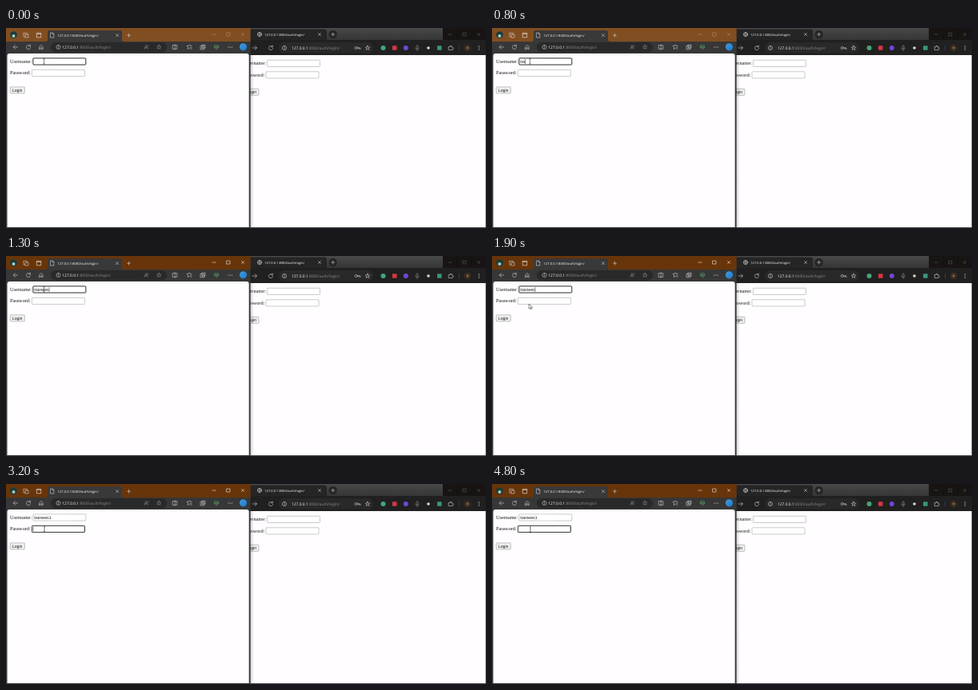
These frames come from a looping animation (600 by 251 pixels, 5 s). An HTML page:

```html
<!DOCTYPE html>
<html lang="en">
<head>
<meta charset="utf-8">
<title>Login form</title>
<style>
  html, body { margin: 0; width: 100%; height: 100%; overflow: hidden; background: #fff; }
  svg { display: block; width: 100vw; height: 100vh; }
  text { font-family: "Open Sans", "Noto Sans", sans-serif; text-rendering: geometricPrecision; white-space: pre; }
  .label { font: 6.25px "Liberation Serif", "Times New Roman", serif; fill: #111; }
  .entry { font: 5.2px "Liberation Sans", Arial, sans-serif; fill: #111; }
  .tab { font-size: 4.15px; fill: #fff; }
  .url { font-size: 4.95px; fill: #8c8c8c; }
  .url tspan { fill: #fff; }
  .icon { fill: none; stroke: #d2d2d2; stroke-width: .6; stroke-linecap: round; stroke-linejoin: round; }
  .dim { stroke: #8d8d8d; }
  .field { fill: #fff; stroke: #8c8c8c; stroke-width: .45; }
  .ring { fill: none; stroke: #1c1c1c; stroke-width: .8; }

  .anim { animation: 5s step-end infinite; }
  #bar { animation-name: bar; }
  #controls { animation-name: controls; }
  #pen { animation-name: type; }
  #nameCaret { animation-name: nameCaret; }
  #nameRing { animation-name: nameRing; }
  #passRing { animation-name: passRing; }
  #passHover { animation-name: passHover; }
  #passCaret { animation-name: blink; }
  #pointer { animation-name: move; }
  #beam { animation-name: beam; }
  #arrow { animation-name: arrow; }

  @keyframes bar { 0% { fill: #814e21; } 26%, 100% { fill: #68350a; } }
  @keyframes controls { 0% { stroke: #a98b70; } 26%, 100% { stroke: #ece6e0; } }
  @keyframes type {
    0% { transform: translateX(0); }
    14% { transform: translateX(1.45px); }
    16% { transform: translateX(6.07px); }
    18% { transform: translateX(7.22px); }
    20% { transform: translateX(10.11px); }
    22% { transform: translateX(13px); }
    24% { transform: translateX(18.49px); }
    46%, 100% { transform: translateX(21.38px); }
  }
  @keyframes nameCaret { 0% { opacity: 0; } 14% { opacity: 1; } 46%, 100% { opacity: 0; } }
  @keyframes nameRing { 0% { opacity: 1; } 64%, 100% { opacity: 0; } }
  @keyframes passRing { 0% { opacity: 0; } 64%, 100% { opacity: 1; } }
  @keyframes passHover { 0% { opacity: 0; } 48%, 100% { opacity: 1; } }
  @keyframes blink { 0% { opacity: 0; } 64% { opacity: 1; } 74% { opacity: 0; } 84% { opacity: 1; } 96%, 100% { opacity: 0; } }
  @keyframes move {
    0% { transform: translate(47.5px, 41.7px); }
    32% { transform: translate(47px, 43px); }
    34% { transform: translate(46.5px, 49px); }
    36% { transform: translate(46.2px, 55px); }
    38% { transform: translate(46.2px, 60px); }
    40% { transform: translate(46px, 63.5px); }
    42% { transform: translate(46px, 65px); }
    46% { transform: translate(47px, 62px); }
    48% { transform: translate(48px, 56.6px); }
    72%, 100% { transform: translate(48px, 57.4px); }
  }
  @keyframes beam { 0% { opacity: 1; } 34% { opacity: 0; } 48%, 100% { opacity: 1; } }
  @keyframes arrow { 0% { opacity: 0; } 34% { opacity: 1; } 48%, 100% { opacity: 0; } }
</style>
</head>
<body>
<svg viewBox="0 0 600 251" preserveAspectRatio="none">
  <defs>
    <linearGradient id="strip" x2="0" y2="1">
      <stop stop-color="#4a494a"/><stop offset="1" stop-color="#343334"/>
    </linearGradient>
    <linearGradient id="shade">
      <stop stop-color="#000" stop-opacity=".18"/><stop offset="1" stop-color="#000" stop-opacity="0"/>
    </linearGradient>
    <linearGradient id="blue" x2="1" y2="1">
      <stop stop-color="#3f9de0"/><stop offset="1" stop-color="#2478c8"/>
    </linearGradient>
    <g id="form">
      <text class="label" x="5" y="43.8">Username:</text>
      <text class="label" x="5" y="58.3">Password:</text>
      <rect class="field" x="33.8" y="37.9" width="66" height="8.2" rx=".8"/>
      <rect class="field" x="32.4" y="52.4" width="66" height="8.2" rx=".8"/>
      <rect x="5.2" y="73.9" width="18.2" height="8.1" rx="1" fill="#efefef" stroke="#808080" stroke-width=".45"/>
      <text class="entry" x="7.8" y="79.8">Login</text>
    </g>
    <path id="plus" d="M-2 0H2M0-2V2"/>
    <path id="cross" d="M-1.5-1.5L1.5 1.5M1.5-1.5L-1.5 1.5"/>
    <path id="reload" d="M2.1-1.5A2.6 2.6 0 1 0 2.6 .5M2.3-3V-1.2H.5"/>
    <path id="star" d="M0-2.8L.8-.9 2.7-.8 1.2 .5 1.7 2.4 0 1.3-1.7 2.4-1.2 .5-2.7-.8-.8-.9Z"/>
    <path id="info" d="M0-2.6A2.6 2.6 0 1 1 0 2.6A2.6 2.6 0 1 1 0-2.6M0-.2V1.2M0-1.3V-1.2"/>
    <path id="puzzle" d="M-2.4-1.4H-.8A.9 .9 0 1 1 .8-1.4H2V0A.8 .8 0 1 1 2 1.3V2.6H-2.4Z"/>
  </defs>

  <!-- right window -->
  <rect width="600" height="251" fill="#fffdff"/>
  <rect x="300" width="300" height="17" fill="url(#strip)"/>
  <path d="M300 1.5H398Q401 1.5 401 4.5V15H300Z" fill="#252525"/>
  <rect x="546" width="54" height="15.5" fill="#171413"/>
  <path d="M564 0V15M582 0V15" stroke="#0e0c0b" stroke-width=".6"/>
  <g class="icon" style="stroke: #6f665f; stroke-width: .5">
    <path d="M553 8H557M571.2 6.2H574.8V9.8H571.2Z"/>
    <use href="#cross" x="591" y="8"/>
  </g>
  <rect x="300" y="15" width="300" height="19" fill="#202020"/>
  <rect x="341" y="18" width="118" height="13.5" rx="6.7" fill="#292929"/>
  <text class="tab" style="font-size: 4.05px" x="323.3" y="9.6">127.0.0.1:8000/auth/login/</text>
  <circle cx="408.7" cy="8" r="5.2" fill="#252525"/>
  <g class="icon">
    <circle cx="317" cy="8" r="2.6"/>
    <path d="M314.5 8H319.5M317 5.4Q314.7 8 317 10.6Q319.3 8 317 5.4" stroke-width=".45"/>
    <use href="#cross" x="392" y="8"/>
    <use href="#plus" x="408.7" y="8"/>
    <path d="M308 25H313.5M311.2 22.7L313.5 25 311.2 27.3"/>
    <use href="#reload" x="331" y="25"/>
    <use href="#info" x="348" y="25"/>
    <circle cx="437.7" cy="25" r="1.6"/>
    <path d="M439.3 25H443V26.5M441.3 25V26.3"/>
    <use href="#star" x="452" y="25"/>
    <path d="M513 22.7A1 1 0 0 1 515 22.7V25A1 1 0 0 1 513 25ZM511.8 25A2.2 2.2 0 0 0 516.2 25M514 27.3V28.5" class="dim"/>
    <use href="#puzzle" x="556" y="25"/>
    <path d="M566.5 22V28" stroke="#4a4a4a"/>
  </g>
  <text class="url" style="font-size: 4.88px" x="357" y="26.8"><tspan>127.0.0.1</tspan>:8000/auth/login/</text>
  <circle cx="471.5" cy="25" r="3" fill="#43a77b"/>
  <rect x="482.9" y="22.2" width="5.6" height="5.6" rx=".8" fill="#d93540"/>
  <circle cx="499.8" cy="25" r="3" fill="#7047d8"/>
  <circle cx="528" cy="25" r="1.8" fill="#d7d7d7"/>
  <rect x="539" y="22.2" width="5.6" height="5.6" rx=".8" fill="#37947d"/>
  <circle cx="577" cy="25" r="4.3" fill="#3a2d20"/>
  <circle cx="577" cy="25" r="1.4" fill="#8d6c42"/>
  <g fill="#ddd">
    <circle cx="591.2" cy="22.9" r=".6"/><circle cx="591.2" cy="25" r=".6"/><circle cx="591.2" cy="27.1" r=".6"/>
  </g>
  <use href="#form" x="292.6" y="2.4"/>
  <rect x="305" y="34" width="5" height="217" fill="url(#shade)"/>
  <rect x="300" y="250" width="300" height="1" fill="#4b4b4b"/>
  <rect x="599.5" y="34" width=".5" height="217" fill="#555"/>

  <!-- left window -->
  <rect width="305.6" height="251" fill="#373737"/>
  <rect id="bar" class="anim" width="305.6" height="17" fill="#814e21"/>
  <path d="M49.5 17Q52 17 52 14.5V5.5Q52 3 54.5 3H142.5Q145 3 145 5.5V14.5Q145 17 147.5 17Z" fill="#393939"/>
  <rect x="56" y="18" width="145" height="12.5" rx="6.2" fill="#292929"/>
  <path d="M1.5 250V35Q1.5 32 4.5 32H300.7Q303.7 32 303.7 35V250Z" fill="#fffdff"/>
  <circle cx="9.5" cy="8.6" r="4.3" fill="#173d3c"/>
  <circle cx="9.5" cy="10" r="2" fill="#a9cbc1"/>
  <g class="icon">
    <path d="M22 6.4H26.4V8M22 6.4V11H23.6M24.4 8.2H28V12H24.4Z"/>
    <path d="M38.7 6.4H43.7V11.8H38.7ZM38.7 7.4H43.7" stroke="#f0e8df"/>
    <path d="M55.8 6H58.2L59.8 7.6V12H55.8ZM58.2 6V7.6H59.8"/>
    <use href="#cross" x="139" y="9.2"/>
    <use href="#plus" x="153.5" y="9.2"/>
    <path d="M14.6 24H9.2M11.6 21.6L9.2 24 11.6 26.4"/>
    <use href="#reload" x="28" y="24"/>
    <path d="M41.8 23.6L44 21.4 46.2 23.6V26.6H44.8V24.7H43.2V26.6H41.8Z"/>
    <use href="#info" x="65.5" y="24"/>
    <path d="M173 26.4L175 21.5 177 26.4M173.7 24.8H176.3M177.4 21.4Q178.6 22.4 177.7 23.6" class="dim"/>
    <use href="#star" x="191.3" y="24" class="dim"/>
    <path d="M208.6 21.6H213.8V26.4H208.6ZM211.2 21V27"/>
    <path d="M229.4 25.2L227.2 26.4 227.6 24.1 226 22.5 228 22.2 229 20.9 230 22.2H232M230.6 24.2H232M230.6 26.2H232"/>
    <path d="M243.3 22.6H247.7V26.8H243.3ZM244.7 22.6V21.2H249V25.2H247.7M244.5 24.7H246.5M245.5 23.7V25.7"/>
    <path d="M263 26.6L260.5 24Q259.8 22 261.4 21.5Q262.5 21.4 263 22.4Q263.5 21.4 264.6 21.5Q266.2 22 265.5 24ZM260.5 24H262L263 23 263.8 24.8 264.4 24H265.5" stroke="#65bd7d"/>
  </g>
  <g id="controls" class="icon anim">
    <path d="M258 8H262.2M276 6H280V10H276Z"/>
    <use href="#cross" x="296" y="8"/>
  </g>
  <g fill="#ddd">
    <circle cx="278" cy="24" r=".6"/><circle cx="280.2" cy="24" r=".6"/><circle cx="282.4" cy="24" r=".6"/>
  </g>
  <circle cx="296.5" cy="23.8" r="4.6" fill="url(#blue)"/>
  <text class="tab" x="64.5" y="10.8">127.0.0.1:8000/auth/login/</text>
  <text class="url" x="70.3" y="25.8"><tspan>127.0.0.1</tspan>:8000/auth/login/</text>

  <use href="#form"/>
  <text class="entry" x="35.2" y="43.8">trainees1</text>
  <g id="pen" class="anim">
    <rect x="35.1" y="38.7" width="23" height="6.7" fill="#fff"/>
    <path id="nameCaret" class="anim" d="M35.5 39.2V44.9" stroke="#111" stroke-width=".5"/>
  </g>
  <rect id="nameRing" class="ring anim" x="33.8" y="37.9" width="66" height="8.2" rx="1"/>
  <rect id="passHover" class="anim" x="32.4" y="52.4" width="66" height="8.2" rx=".8" fill="none" stroke="#666" stroke-width=".45"/>
  <rect id="passRing" class="ring anim" x="32.4" y="52.4" width="66" height="8.2" rx="1"/>
  <path id="passCaret" class="anim" d="M34.2 53.7V59.4" stroke="#111" stroke-width=".5"/>

  <g id="pointer" class="anim">
    <path id="beam" class="anim" d="M-1-3.2H1M0-3.2V3.2M-1 3.2H1" fill="none" stroke="#111" stroke-width=".6"/>
    <path id="arrow" class="anim" d="M0 0V6.2L1.4 4.9 2.4 7.1 3.4 6.7 2.4 4.5H4.3Z" fill="#fff" stroke="#111" stroke-width=".5"/>
  </g>
</svg>
</body>
</html>
```
